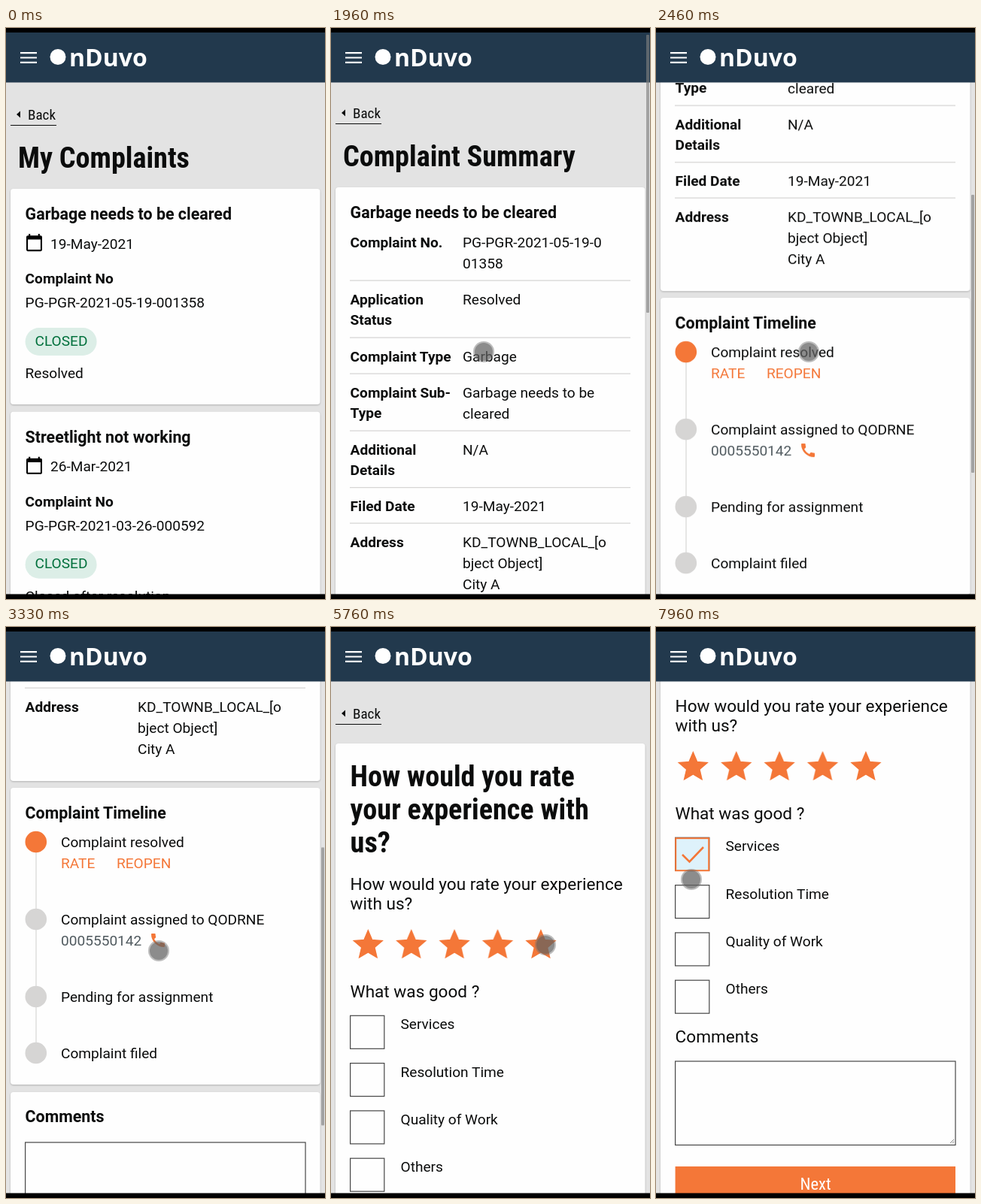
Recreate the animation shown at these times as an HTML page. Size 424 by 760 pixels, loop 8000 ms.

```html
<!DOCTYPE html>
<html lang="en">
<head>
<meta charset="utf-8">
<title>Complaint feedback</title>
<style>
  html, body { margin: 0; width: 100%; height: 100%; overflow: hidden; background: #000; }
  svg { display: block; width: 424px; height: 760px; }
  text { font: 19.1px Roboto, sans-serif; fill: #0b0c0c; }
  .b { font-weight: 700; }
  .head { font-weight: 700; font-size: 21.4px; }
  .big { font-size: 22.6px; }
  .title, .back, .button { font-family: "Roboto Condensed", Roboto, sans-serif; font-stretch: 75%; }
  .title { font-size: 38.2px; font-weight: 700; }
  .button { font-size: 22.6px; fill: #fff; text-anchor: middle; }
  .brand { font: 700 32px "Open Sans", "Noto Sans", sans-serif; fill: #fff; }
  .link { fill: #f47738; }
  .muted { fill: #505a5f; }
  .closed { fill: #00703c; }
  .card { fill: #fefefe; filter: drop-shadow(0 1px 1px rgba(0, 0, 0, .22)); }
  .box { fill: #fefefe; stroke: #464646; stroke-width: 1.2; }
  .thumb { fill: rgba(128, 128, 128, .65); }
</style>
</head>
<body>
<svg id="stage" viewBox="0 0 424 760"></svg>
<script>
const LOOP = 8000;
const ORANGE = '#f47738';
const OUT = 'cubic-bezier(.33,1,.68,1)';
const MOVE = 'cubic-bezier(.3,.3,.4,1)';
const HOLD = 'steps(1,end)';

const stage = document.getElementById('stage');

function add(parent, tag, attrs = {}, content = '') {
  const el = document.createElementNS('http://www.w3.org/2000/svg', tag);
  for (const name in attrs) el.setAttribute(name, attrs[name]);
  el.textContent = content;
  parent.append(el);
  return el;
}
const group = (parent, attrs) => add(parent, 'g', attrs);
const text = (parent, x, y, content, cls = '') => add(parent, 'text', { x, y, class: cls }, content);
const rect = (parent, x, y, width, height, attrs) => add(parent, 'rect', { x, y, width, height, ...attrs });
const line = (parent, d, stroke, width = 1.2) => add(parent, 'path', { d, stroke, 'stroke-width': width, fill: 'none' });
const card = (parent, top, bottom) => rect(parent, 6, top, 411.5, bottom - top, { rx: 4, class: 'card' });

// Steps are [time, value, easing to the next step].
function play(el, property, steps, format = v => v) {
  const frames = [...steps, [LOOP, steps[steps.length - 1][1]]].map(([time, value, easing = HOLD]) =>
    ({ offset: time / LOOP, [property]: format(value), easing }));
  el.animate(frames, { duration: LOOP, iterations: Infinity });
}

function backLink(page) {
  add(page, 'path', { d: 'M14 115l5-4.5v9z', fill: '#0b0c0c' });
  text(page, 29, 122, 'Back', 'back');
  line(page, 'M6 129.5H67', '#0b0c0c', 1);
}

function textArea(page, y) {
  rect(page, 25.6, y, 372.4, 111.5, { class: 'box' });
  line(page, `M391 ${y + 109}l5-5M394 ${y + 109}l2-2`, '#666', .8);
}

function complaintList(page) {
  const calendar = 'M20 3h-1V1h-2v2H7V1H5v2H4c-1.1 0-2 .9-2 2v16c0 1.1.9 2 2 2h16c1.1 0 2-.9 2-2V5c0-1.1-.9-2-2-2zm0 18H4V8h16v13z';
  const items = [
    ['Garbage needs to be cleared', '19-May-2021', 'PG-PGR-2021-05-19-001358', 'Resolved'],
    ['Streetlight not working', '26-Mar-2021', 'PG-PGR-2021-03-26-000592', 'Closed after resolution']
  ];
  backLink(page);
  text(page, 16, 186, 'My Complaints', 'title');
  items.forEach(([name, date, number, status], i) => {
    const item = group(page, { transform: `translate(0 ${i * 296.7})` });
    card(item, 214, 501);
    text(item, 25.6, 255, name, 'head');
    add(item, 'path', { d: calendar, transform: 'translate(24.9 273) scale(1.05)' });
    text(item, 59, 293.5, date);
    text(item, 25.6, 340, 'Complaint No', 'b');
    text(item, 25.6, 372, number);
    rect(item, 25.6, 399, 95, 37, { rx: 18.5, fill: '#dceee7' });
    text(item, 38.5, 422.5, 'CLOSED', 'closed');
    text(item, 25.6, 466, status);
  });
}

function complaintSummary(page) {
  const rows = [
    [293.5, ['Complaint No.'], ['PG-PGR-2021-05-19-0', '01358']],
    [369.5, ['Application', 'Status'], ['Resolved']],
    [445.5, ['Complaint Type'], ['Garbage']],
    [493.5, ['Complaint Sub-', 'Type'], ['Garbage needs to be', 'cleared']],
    [569.5, ['Additional', 'Details'], ['N/A']],
    [645, ['Filed Date'], ['19-May-2021']],
    [692.5, ['Address'], ['KD_TOWNB_LOCAL_[o', 'bject Object]', 'City A']]
  ];
  backLink(page);
  text(page, 16, 186, 'Complaint Summary', 'title');
  card(page, 214, 785);
  text(page, 25.6, 255, 'Garbage needs to be cleared', 'head');
  rows.forEach(([y, keys, values], i) => {
    if (i) line(page, `M25 ${y - 31.3}H398`, '#d6d5d4');
    keys.forEach((key, n) => text(page, 25.6, y + n * 27.8, key, 'b'));
    values.forEach((value, n) => text(page, 175, y + n * 28, value));
  });

  const phone = 'M20.01 15.38c-1.23 0-2.42-.2-3.53-.56-.35-.12-.74-.03-1.01.24l-1.57 1.97c-2.83-1.35-5.48-3.9-6.89-6.83l1.95-1.66c.27-.28.35-.67.24-1.02-.37-1.11-.56-2.3-.56-3.53 0-.54-.45-.99-.99-.99H4.19C3.65 3 3 3.24 3 3.99 3 13.28 10.73 21 20.01 21c.71 0 .99-.63.99-1.18v-3.45c0-.54-.45-.99-.99-.99z';
  const events = [
    [866, 'Complaint resolved'],
    [969, 'Complaint assigned to QODRNE'],
    [1072, 'Pending for assignment'],
    [1147, 'Complaint filed']
  ];
  card(page, 794, 1189);
  text(page, 25.6, 834.5, 'Complaint Timeline', 'head');
  line(page, 'M40 866V1147', '#d6d5d4');
  events.forEach(([y, label], i) => {
    add(page, 'circle', { cx: 39.8, cy: y, r: 14.3, fill: i ? '#d6d5d4' : ORANGE });
    text(page, 73, y + 7.3, label);
  });
  text(page, 73, 901, 'RATE', 'link');
  text(page, 147, 901, 'REOPEN', 'link');
  text(page, 73, 1004, '0005550142', 'muted');
  add(page, 'path', { d: phone, fill: ORANGE, transform: 'translate(190 985)' });

  card(page, 1199, 1480);
  text(page, 25.6, 1238.5, 'Comments', 'head');
  textArea(page, 1266);
}

function ratingForm(page) {
  const star = '12,17.27 18.18,21 16.54,13.97 22,9.24 14.81,8.63 12,2 9.19,8.63 2,9.24 7.46,13.97 5.82,21';
  backLink(page);
  card(page, 155, 1022);
  ['How would you rate', 'your experience with', 'us?'].forEach((s, i) => text(page, 25.6, 212 + i * 44, s, 'title'));
  text(page, 25.6, 349.7, 'How would you rate your experience', 'big');
  text(page, 25.6, 375.5, 'with us?', 'big');

  for (let i = 0; i < 5; i++) {
    const place = `translate(${26.5 + i * 57.4} 400.2) scale(1.9)`;
    add(page, 'polygon', {
      points: star, fill: 'none', stroke: ORANGE, 'stroke-width': 1.7,
      transform: `${place} translate(1.2 1.15) scale(.9)`
    });
    const full = add(page, 'polygon', { points: star, fill: ORANGE, transform: place });
    play(full, 'opacity', [[0, 0], [5760, 1]]);
  }

  text(page, 25.6, 492.7, 'What was good ?', 'big');
  ['Services', 'Resolution Time', 'Quality of Work', 'Others'].forEach((label, i) => {
    const y = 517.3 + i * 63.3;
    rect(page, 25.6, y, 45.2, 44, { class: 'box' });
    text(page, 92.5, y + 18, label);
  });
  const checked = group(page);
  rect(checked, 26.2, 518.2, 44, 43, { fill: '#def2fb', stroke: ORANGE, 'stroke-width': 2 });
  line(checked, 'M35 540l9.5 9.5L63 530', ORANGE, 2.6);
  play(checked, 'opacity', [[0, 0], [7700, 1]]);

  text(page, 25.6, 790, 'Comments', 'big');
  textArea(page, 815);
  rect(page, 25.6, 955, 372.4, 47.5, { fill: ORANGE });
  text(page, 212, 986, 'Next', 'button');
}

rect(stage, 0, 0, 424, 760, { fill: '#e3e3e3' });

const screens = [
  { draw: complaintList, shown: [[0, 1], [1260, 0]] },
  {
    draw: complaintSummary,
    shown: [[0, 0], [1260, 1], [4660, 0]],
    scroll: [[0, 0], [1960, 2], [2160, 2, OUT], [2560, 442], [2800, 442, OUT], [3330, 580, 'ease-out'], [3560, 586]],
    thumb: { height: 370, ratio: .492, shown: [[0, 0], [1960, 1], [3700, 1, 'linear'], [3950, 0]] }
  },
  {
    draw: ratingForm,
    shown: [[0, 0], [4660, 1]],
    scroll: [[0, 0], [6440, 0, OUT], [6560, 219, 'ease-out'], [6700, 237]],
    thumb: { height: 529, ratio: .707, shown: [[0, 0], [6460, 1], [7000, 1, 'linear'], [7230, 0]] }
  }
];

for (const { draw, shown, scroll } of screens) {
  const page = group(stage);
  draw(page);
  play(page, 'opacity', shown);
  if (scroll) play(page, 'transform', scroll, y => `translateY(${-y}px)`);
}

// Fixed header and black screen edges
rect(stage, 0, 0, 424, 72.5, { fill: '#22394d' });
rect(stage, 0, 0, 424, 6, { fill: '#000' });
rect(stage, 0, 753.5, 424, 6.5, { fill: '#000' });
line(stage, 'M19 33.2H41M19 39.5H41M19 45.8H41', '#fff', 2.2);
add(stage, 'circle', { cx: 69, cy: 38.5, r: 10.5, fill: '#fff' });
text(stage, 84, 51, 'nDuvo', 'brand');

for (const { scroll, thumb } of screens) {
  if (!thumb) continue;
  const bar = rect(stage, 419, 8, 4, thumb.height, { rx: 1, class: 'thumb' });
  play(bar, 'opacity', thumb.shown);
  play(bar, 'transform', scroll, y => `translateY(${y * thumb.ratio}px)`);
}

const pointer = group(stage);
add(pointer, 'circle', { r: 14, fill: 'rgba(110,110,110,.45)' });
add(pointer, 'circle', { r: 12, fill: 'rgba(90,90,90,.5)' });
play(pointer, 'opacity', [[0, 0], [400, 1]]);
play(pointer, 'transform', [
  [0, [405, 465]],
  [400, [405, 465], MOVE], [730, [112, 430]],
  [1000, [112, 430], 'linear'], [1040, [87, 422]],
  [1530, [87, 422], MOVE], [1660, [203, 431]],
  [3700, [203, 431], MOVE], [4100, [91, 312]],
  [4860, [91, 312], MOVE], [5260, [285, 423]],
  [5800, [285, 423], MOVE], [6060, [280, 566]],
  [6860, [280, 566], MOVE], [7230, [47, 304]],
  [7760, [47, 304], MOVE], [7960, [47, 336]]
], ([x, y]) => `translate(${x}px, ${y}px)`);
</script>
</body>
</html>
```
